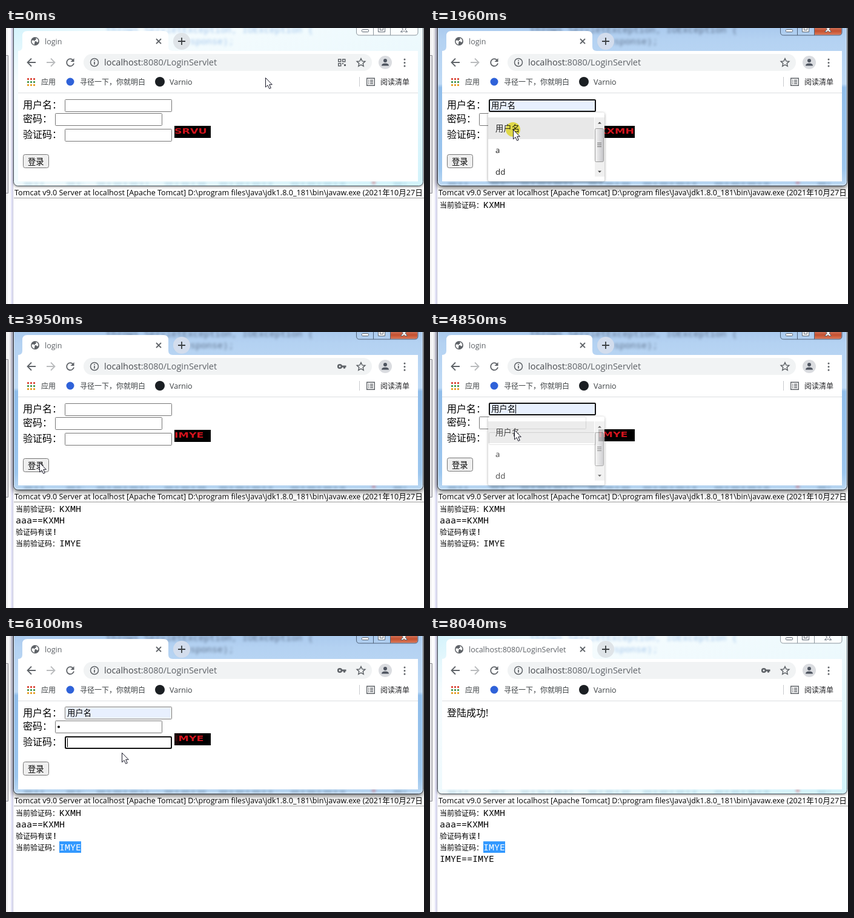
These frames come from a looping animation (690 px wide and 457 px high, 8.14 s). An HTML page:

```html
<!DOCTYPE html>
<html lang="zh-CN">
<head>
<meta charset="utf-8">
<style>
html, body { margin: 0; width: 100%; height: 100%; overflow: hidden; background: #fff; }
svg { display: block; font: 12px 'Open Sans', 'Noto Sans CJK SC', 'Noto Sans CJK', sans-serif; }
.label { font-size: 16px; }
.value { font-size: 13.33px; }
.title { font-size: 12.5px; fill: #5f6368; }
.log { font-weight: 500; }
.mono { font: 15px 'Noto Sans Mono', 'DejaVu Sans Mono', 'Noto Sans CJK SC', monospace; }
.captcha { font: bold 12.5px 'DejaVu Sans', sans-serif; fill: #d3131c; }
/* punctuation centred in its cell */
.mid { font-family: 'Noto Sans CJK TC', 'Noto Sans CJK SC', sans-serif; }
.field { fill: #fff; stroke: #767676; }
.ring { fill: #fff; stroke: #101010; stroke-width: 2; }
.icon { fill: none; stroke: #5f6368; stroke-width: 1.8; }
.blur { filter: blur(2px); }
</style>
</head>
<body>
<svg width="690" height="457" viewBox="0 0 690 457">
  <defs>
    <linearGradient id="blue" x2="0" y2="1">
      <stop offset="0" stop-color="#a2c3ea"/><stop offset=".14" stop-color="#b4d2f2"/>
      <stop offset=".4" stop-color="#bfdaf5"/><stop offset=".42" stop-color="#90bdea"/>
      <stop offset=".9" stop-color="#9cc6ee"/><stop offset="1" stop-color="#bcd8f2"/>
    </linearGradient>
    <linearGradient id="pale" x2="1" y2="1">
      <stop offset="0" stop-color="#cdf1fb"/><stop offset=".2" stop-color="#f6fcfe"/>
      <stop offset=".6" stop-color="#ecf9fd"/><stop offset="1" stop-color="#d2f3fb"/>
    </linearGradient>
    <linearGradient id="red" x2="0" y2="1">
      <stop offset="0" stop-color="#d99080"/><stop offset=".6" stop-color="#c4502f"/>
      <stop offset="1" stop-color="#dc7a5a"/>
    </linearGradient>
    <linearGradient id="thumb">
      <stop offset="0" stop-color="#f5f5f5"/><stop offset="1" stop-color="#c4c4c8"/>
    </linearGradient>
    <clipPath id="frame"><rect x="13" y="-20" width="675" height="281" rx="6"/></clipPath>
    <path id="winButtons" d="M578.5-5V7q0 5 5 5H675q5 0 5-5V-5M606.5 0V12M634.5 0V12"/>
    <!-- code behind the glass -->
    <g id="behind">
      <g class="mono blur" opacity=".75">
        <text x="165" y="8">throws ServletException, IOException {</text>
        <text x="277" y="27">(response);</text>
      </g>
      <path class="blur" d="M30 258H62M100 258H128M150 258H235M262 258H330M352 258H440M470 258H560M640 258H660" stroke="currentColor" stroke-width="3" stroke-dasharray="14 3 6 4" opacity=".45"/>
      <circle class="blur" cx="607" cy="256" r="3" fill="#d0606a" opacity=".6"/>
    </g>
  </defs>

  <!-- console -->
  <rect width="690" height="457" fill="#fff"/>
  <rect width="3" height="457" fill="#f2f2f2"/>
  <path d="M0 45.5H3.5V273.5H0" fill="#e3e3e6" stroke="#8c8c92"/>
  <rect x="4" width="4" height="457" fill="#fbfbfd"/>
  <rect x="8" width="4" height="457" fill="#e2e2f6"/>
  <path d="M11.5 0V457" stroke="#c3c3da"/>
  <path d="M13 281.5H690" stroke="#9a9a9a"/>
  <text x="14" y="277" font-size="12.6">Tomcat v9.0 Server at localhost [Apache Tomcat] D:\program files\Java\jdk1.8.0_181\bin\javaw.exe (2021年10月27日</text>
  <g class="log">
    <g data-on="950-8140"><text x="16" y="298">当前验证码：</text><text class="mono" x="88" y="298">KXMH</text></g>
    <g data-on="3600-8140">
      <text class="mono" x="16" y="317">aaa==KXMH</text>
      <text x="16" y="336">验证码有误</text><text class="mono" x="76" y="336">!</text>
      <text x="16" y="355">当前验证码：</text>
      <text class="mono" x="88" y="355">IMYE</text>
    </g>
    <g data-on="5680-8140">
      <rect x="88" y="340" width="36" height="19" fill="#3399ff"/>
      <text class="mono" x="88" y="355" fill="#fff">IMYE</text>
    </g>
    <text class="mono" x="16" y="374" data-on="7250-8140">IMYE==IMYE</text>
  </g>

  <!-- window frame -->
  <g data-on="300-7870">
    <rect x="12.5" y="-20" width="676" height="281.5" rx="7" fill="url(#blue)" stroke="#2e3640" style="filter:drop-shadow(0 2px 5px #000a)"/>
    <g clip-path="url(#frame)" fill="#46566e" color="#46627f"><use href="#behind"/></g>
    <rect x="13.5" y="-20" width="674" height="280" rx="6" fill="none" stroke="#fff" opacity=".6"/>
    <path d="M635-5V11.5H675q4.5 0 4.5-5V-5z" fill="url(#red)"/>
    <use href="#winButtons" fill="none" stroke="#4e6078"/>
    <circle cx="290" cy="22" r="14" fill="#d3dded"/>
  </g>
  <g data-on="0-300 7870-8140">
    <rect x="12.5" y="-20" width="676" height="281.5" rx="7" fill="url(#pale)" stroke="#4c555d" style="filter:drop-shadow(0 1px 2px #0006)"/>
    <g clip-path="url(#frame)" fill="#86b2e4" color="#7eabc4"><use href="#behind"/></g>
    <use href="#winButtons" fill="#fffc" stroke="#8b959d"/>
    <circle cx="290" cy="22" r="14" fill="#dfe4e8"/>
  </g>
  <g fill="#fff" stroke="#5b6470">
    <rect x="587.5" y="2.5" width="11" height="4" rx="1"/>
    <path d="M614.5-3V6.5H625.5V-3M617.5-1V3.5H622.5V-1"/>
    <path d="M651.5 6.5L655.5 2 651-3H663L659 2 662.5 6.5H659L657 4.5 655 6.5z"/>
  </g>

  <!-- tab and toolbar -->
  <path d="M20 38Q27 38 27 31V13Q27 5 35 5H260Q268 5 268 13V31Q268 38 275 38H680V254H20z" fill="#fff"/>
  <g data-on="0-700 880-3560 3700-7220 7330-8140">
    <circle cx="48" cy="22" r="7" fill="#5f6368"/>
    <path d="M43 20.5h3l2 2.5-1 1.5v3q-4-1-4.500-5zM49 16.500l3 1.500 1.500 4-2 2-1.500-2h-3l1-2 2-1z" fill="#fff"/>
  </g>
  <text class="title" x="64" y="26.500" data-on="0-7300">login</text>
  <text class="title" x="64" y="26.500" data-on="7300-8140">localhost:8080/LoginServlet</text>
  <path class="icon" d="M248 18l8 8m0-8l-8 8"/>
  <path class="icon" d="M284 22h12M290 16v12" style="stroke:#3c4043"/>
  <path class="icon" d="M49 57H36M42 50.500L35.500 57 42 63.500"/>
  <path class="icon" d="M67 57H80M74 50.500L80.500 57 74 63.500" style="stroke:#babcbe"/>
  <g data-on="0-650 880-8140">
    <path class="icon" d="M110.500 53A6 6 0 1 0 112 58.500"/><path d="M112.500 50v6h-6z" fill="#5f6368"/>
  </g>
  <path class="icon" d="M101 52l10.500 10.500m0-10.500L101 62.500" data-on="650-880"/>
  <rect x="128" y="43" width="476" height="28" rx="14" fill="#f1f3f4"/>
  <circle class="icon" cx="146" cy="57" r="6.500" style="stroke-width:1.500"/>
  <path class="icon" d="M146 56v4.500M146 53v1.600"/>
  <text x="162" y="62" font-size="14.500" fill="#5f6368"><tspan fill="#45484c">localhost</tspan>:8080/LoginServlet</text>
  <g data-on="0-880">
    <path class="icon" style="stroke-width:1.500" d="M548.750 51.750h4v4h-4zM555.750 51.750h4v4h-4zM548.750 58.750h4v4h-4z"/>
    <path d="M555 58h2v2h-2zM558 60h3v3h-3z" fill="#5f6368"/>
  </g>
  <g data-on="2400-4420 5300-8140">
    <circle class="icon" cx="551" cy="57" r="2.800" style="stroke-width:2.600"/>
    <path d="M554 55.500h7.500v3H560v2h-3v-2h-3z" fill="#5f6368"/>
  </g>
  <path class="icon" style="stroke-width:1.500" d="M586 50.500l2 4.400 4.800.5-3.600 3.200 1 4.700-4.200-2.400-4.200 2.400 1-4.700-3.600-3.200 4.800-.5z"/>
  <circle cx="626" cy="57" r="11" fill="#dadce0"/>
  <circle cx="626" cy="54" r="3" fill="#4f5560"/><path d="M620 62.500q0-4 6-4t6 4z" fill="#4f5560"/>
  <path d="M658 52h0M658 57.500h0M658 63h0" stroke="#5f6368" stroke-width="3" stroke-linecap="round"/>

  <!-- bookmarks -->
  <g stroke-width="3" stroke-dasharray="3 2">
    <path d="M35 84.500H48" stroke="#dd4b3e"/><path d="M35 89.500H48" stroke="#4a9a56"/><path d="M35 94.500H48" stroke="#e6a12c"/>
  </g>
  <circle cx="106" cy="89" r="6.500" fill="#2f62d9"/>
  <circle cx="254" cy="89" r="8" fill="#1b1f23"/>
  <g fill="#3c4043">
    <text x="58" y="94">应用</text>
    <text x="122" y="94">寻径一下<tspan class="mid">，</tspan>你就明白</text>
    <text x="270" y="94" font-size="12.500">Varnio</text>
    <text x="618" y="94" fill="#202124">阅读清单</text>
  </g>
  <path d="M583.500 81V97" stroke="#c8cacd"/>
  <path class="icon" style="stroke-width:1.400" d="M595.700 83.200h12.600v12h-12.600zM598 86.500h1.500M601 86.500h5M598 89.300h1.500M601 89.300h5M598 92h1.500M601 92h5"/>
  <path d="M20 107.500H680" stroke="#dcdee1"/>

  <!-- login page -->
  <g data-on="0-7300">
    <text class="label" x="28" y="133">用户名<tspan class="mid">：</tspan></text>
    <g id="form">
      <text class="label" x="28" y="156">密码<tspan class="mid">：</tspan></text>
      <text class="label" x="28" y="182">验证码<tspan class="mid">：</tspan></text>
      <rect class="field" x="97.500" y="118.500" width="176" height="20" rx="1"/>
      <rect class="field" x="81.500" y="141.500" width="176" height="20" rx="1"/>
      <rect class="field" x="97.500" y="167.500" width="176" height="20" rx="1"/>
      <rect class="ring" x="98" y="119" width="175" height="19" rx="2" data-on="1480-2220 4420-5060"/>
      <rect class="ring" x="82" y="142" width="175" height="19" rx="2" data-on="2220-2750 5060-5960"/>
      <rect class="ring" x="98" y="168" width="175" height="19" rx="2" data-on="2750-3630 5960-7300"/>
      <g data-on="1830-3630 4700-7300">
        <rect x="99" y="120" width="173" height="17" fill="#e8f0fe"/>
        <text class="value" x="101" y="133">用户名</text>
      </g>
      <path d="M141.500 121V136" stroke="#000" data-on="4780-5060"/>
      <circle cx="87" cy="151.500" r="2" data-on="2400-3630 5300-7300"/>
      <text class="value" id="code" x="101" y="182"></text>
      <path d="M101.500 170V185" stroke="#000" data-on="2750-2900 5960-6450"/>
      <rect x="278" y="162" width="60" height="20"/>
      <g class="captcha" transform="translate(278 174.500) scale(1.4 1)">
        <text data-on="0-950">SRVU</text>
        <text data-on="950-3640">KXMH</text>
        <text data-on="3640-7300">IMYE</text>
      </g>
      <rect x="278" y="162" width="8" height="20" fill="#1c0608" opacity=".85" data-on="4880-7300"/>
      <rect x="28.500" y="209.500" width="42" height="22" rx="3" fill="#efefef" stroke="#767676"/>
      <text class="value" x="36" y="226">登录</text>
    </g>
  </g>
  <text class="label" x="28" y="133" data-on="7300-8140">登陆成功!</text>

  <!-- suggestions -->
  <g id="menu">
    <rect x="96" y="140" width="192" height="114" rx="3" fill="#fff" style="filter:drop-shadow(0 1px 2px #0006)"/>
    <rect x="96" y="148" width="175" height="36" fill="#e8e8e8" data-on="1760-2100 4640-5000"/>
    <g class="value" fill="#222"><text x="108" y="171">用户名</text><text x="108" y="207">a</text><text x="108" y="243">dd</text></g>
    <rect x="272" y="148" width="16" height="98" fill="#f0f0f0"/>
    <rect x="272.500" y="166.500" width="14" height="55" rx="2" fill="url(#thumb)" stroke="#989898"/>
    <path d="M276 190.500h7M276 193.500h7M276 196.500h7" stroke="#666"/>
    <path d="M277 158.500l3-3 3 3zM277 236.500l3 3 3-3z" fill="#444"/>
  </g>

  <g id="cursor">
    <circle id="halo" r="12" fill="#f6ee50" style="mix-blend-mode:multiply"/>
    <path d="M.5.500V16L4 12.700 6.700 18.500 9.300 17.300 6.700 11.700H11.300z" fill="#fff" stroke="#1a1a2a"/>
  </g>
</svg>
<script>
const LOOP = 8140;
const $ = id => document.getElementById(id);
const clamp = v => Math.min(1, Math.max(0, v));
const within = (t, [from, to]) => t >= from && t < to;

const timed = [...document.querySelectorAll('[data-on]')].map(el => ({
  el, spans: el.dataset.on.split(' ').map(s => s.split('-').map(Number))
}));

// time, x, y
const path = [
  [0, 428, 82], [300, 426, 78], [780, 412, 70], [950, 412, 71], [1450, 150, 126], [1660, 150, 126],
  [1830, 137, 168], [2010, 137, 168], [2200, 150, 150], [2450, 150, 152], [2720, 150, 177],
  [3150, 150, 180], [3460, 57, 218], [3950, 55, 216], [4320, 145, 127], [4560, 145, 127],
  [4720, 139, 162], [4900, 139, 162], [5050, 150, 150], [5300, 150, 150], [5620, 106, 340],
  [5720, 106, 340], [5950, 180, 177], [6100, 191, 193], [6450, 185, 195], [6900, 84, 220],
  [7080, 52, 219], [7300, 52, 219], [7790, 616, 272], [LOOP, 616, 272]
];
const clicks = [300, 1480, 1640, 1960, 2220, 2750, 3500, 4420, 4560, 4780, 5060, 5660, 5960, 7120];

function cursorAt(t) {
  const i = path.findIndex(k => k[0] > t);
  const [t0, x0, y0] = path[i - 1], [t1, x1, y1] = path[i];
  const p = (t - t0) / (t1 - t0), e = p * p * (3 - 2 * p);
  return [x0 + (x1 - x0) * e, y0 + (y1 - y0) * e].map(Math.round);
}

function menuAlpha(t) {
  const fade = end => 1 - clamp((t - end) / 160);
  if (within(t, [1640, 2200])) return fade(2010);
  if (within(t, [4560, 5000])) return fade(4820);
  return 0;
}

function codeAt(t) {
  if (t < 3630) return 'a'.repeat(Math.min(3, Math.max(0, Math.floor((t - 2800) / 100))));
  return t >= 6450 ? 'IMYE' : '';
}

function draw(now) {
  const t = now % LOOP;
  for (const { el, spans } of timed) el.style.display = spans.some(s => within(t, s)) ? '' : 'none';
  const raised = within(t, [2010, 3630]) || within(t, [4780, 7300]);
  $('form').setAttribute('transform', `translate(0 ${raised ? -1 : 0})`);
  $('code').textContent = codeAt(t);
  $('menu').style.opacity = menuAlpha(t);
  $('cursor').setAttribute('transform', `translate(${cursorAt(t)})`);
  $('cursor').style.display = t < 7870 ? '' : 'none';
  $('halo').style.display = clicks.some(c => Math.abs(t - c) < 60) ? '' : 'none';
  requestAnimationFrame(draw);
}
requestAnimationFrame(draw);
</script>
</body>
</html>
```
